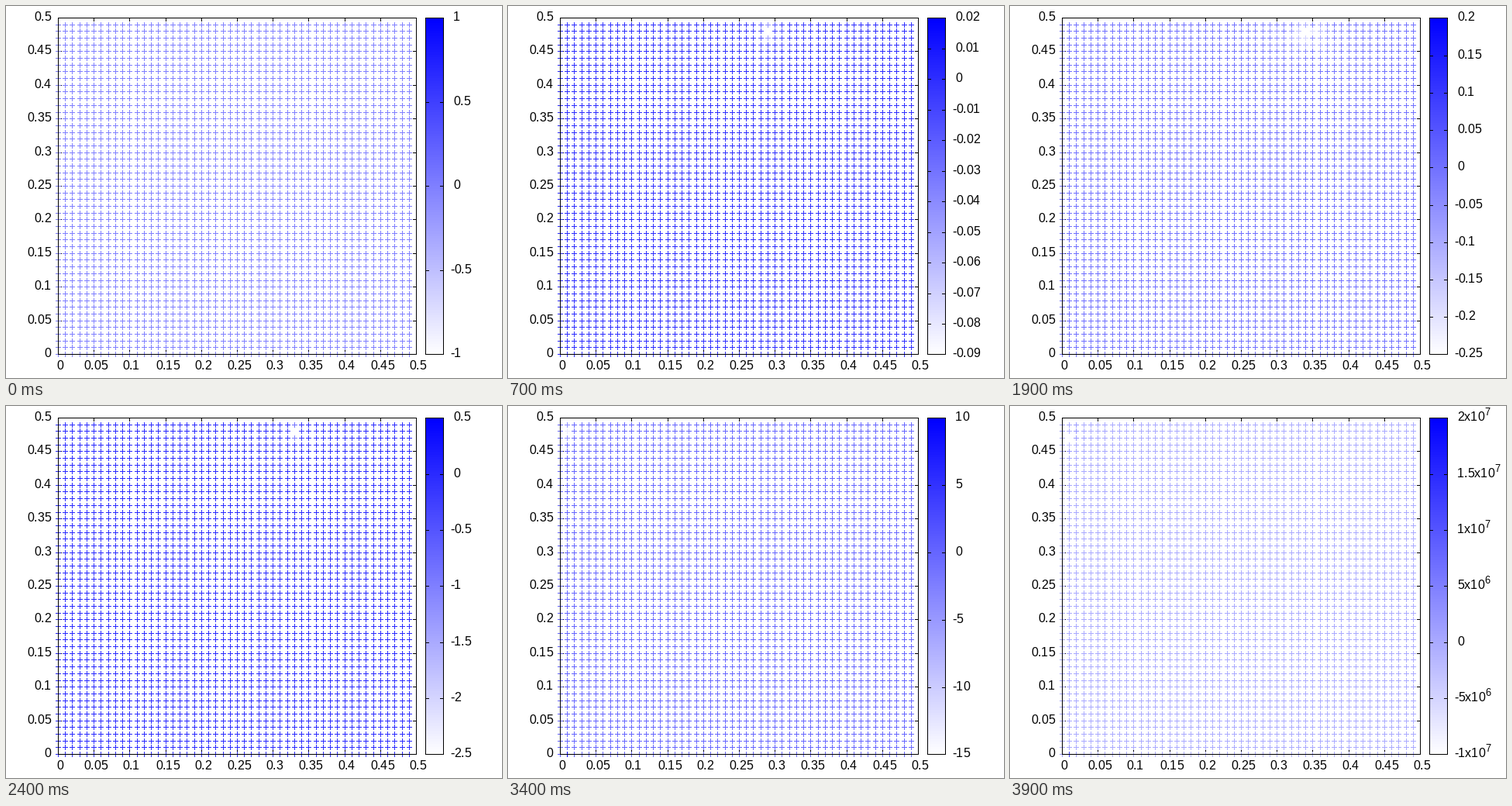
Recreate the animation shown at these times as a matplotlib script. Size 640x480 px, loop 4 s.

```python
import math

import matplotlib.pyplot as plt
import numpy as np
from matplotlib.animation import FuncAnimation
from matplotlib.collections import LineCollection

plt.rcParams["text.hinting"] = "native"

W, H, DPI = 640, 480, 100
LEFT, RIGHT, TOP, BOTTOM = 67, 529, 15, 449
BAR_L, BAR_R, BAR_TEXT = 541, 564, 573
TIC = 4
FONT_PX = 16
N = 50
FRAMES, INTERVAL = 40, 100

# Key points: step, -low, high, core column, core row, core offset, halo offset
KEYS = np.array([
    (1, .009, .002, 27, 48, -.8, -.3),
    (7, .09, .02, 29, 48, -.8, -.3),
    (19, .25, .2, 34, 48, -.5, -.6),
    (24, 2.5, .5, 33, 48, -.8, -.15),
    (29, 4, 10, 48, 48, .72, -.35),
    (34, 15, 10, 1, 48, -.5, 0),
    (39, 1e7, 2e7, 1, 47, -.4, .15),
])

ADVANCE = {" ": .278, ".": .278, "-": .333, "x": .5}


def advance(char, size=FONT_PX):
    return round(ADVANCE.get(char, .556) * size)


def text_width(s):
    return sum(advance(c) for c in s)


def hline(x0, x1, y):
    return [(x0, y + .5), (x1 + 1, y + .5)]


def vline(x, y0, y1):
    return [(x + .5, y0), (x + .5, y1 + 1)]


def box(x0, x1):
    return [hline(x0, x1, TOP), hline(x0, x1, BOTTOM),
            vline(x0, TOP, BOTTOM), vline(x1, TOP, BOTTOM)]


def px(frac):
    return LEFT + math.floor(frac * (RIGHT - LEFT) + .5)


def py(frac):
    return BOTTOM - math.floor(frac * (BOTTOM - TOP) + .5)


def palette(t):
    t = np.clip(t, 0, 1)
    return np.stack([1 - t, 1 - t, np.ones_like(t)], axis=-1)


def tick_step(span):
    power = 10.0 ** math.floor(math.log10(span) + 1e-9)
    m = span / power
    return power * (.1 if m < 1.15 else .2 if m < 1.99 else .5 if m < 4.99 else 1)


def bar_range(n):
    """Tick step and the first and last tick, as multiples of it."""
    if n == 0:
        return .5, -2, 2
    low, high = (math.exp(np.interp(n, KEYS[:, 0], np.log(KEYS[:, k])))
                 for k in (1, 2))
    step = tick_step(low + high)
    return step, -math.ceil(low / step - 1e-6), math.ceil(high / step - 1e-6)


fig = plt.figure(figsize=(W / DPI, H / DPI), dpi=DPI, facecolor="white")
ax = fig.add_axes([0, 0, 1, 1])


def add_lines(segments, zorder):
    lines = LineCollection(segments, colors="black", linewidths=72 / DPI,
                           capstyle="butt", zorder=zorder)
    lines.set_snap(False)
    ax.add_collection(lines, autolim=False)
    return lines


def put_text(x, base, s, size=FONT_PX):
    """Set characters one by one on whole pixels."""
    chars = []
    for c in s:
        if c != " ":
            chars.append(ax.text(x, base, c, family="Liberation Sans",
                                 color="black", fontsize=size * 72 / DPI,
                                 ha="left", va="baseline", zorder=5))
        x += advance(c, size)
    return chars


# Colour bar
ax.imshow(palette(np.linspace(1, 0, 128))[:, None, :], aspect="auto",
          extent=(BAR_L, BAR_R + 1, BOTTOM + 1, TOP), interpolation="nearest")
ax.set_xlim(0, W)
ax.set_ylim(H, 0)
ax.axis("off")

# Axis ticks and labels
ticks = []
for k in range(11):
    x, y = px(k / 10), py(k / 10)
    ticks += [hline(LEFT, LEFT + TIC, y), hline(RIGHT - TIC, RIGHT, y),
              vline(x, TOP, TOP + TIC), vline(x, BOTTOM - TIC - 1, BOTTOM)]
    label = f" {k * .05:g}"
    put_text(LEFT - 9 - text_width(label), y + 4, label)
    put_text(x - text_width(label) // 2, 469, label)
add_lines(ticks, 1)
add_lines(box(LEFT, RIGHT) + box(BAR_L, BAR_R), 3)
bar_ticks = add_lines([], 4)

# Grid of plus signs
cols, rows = (g.ravel() for g in np.meshgrid(np.arange(N), np.arange(N)))
points = [(px(i / N), py(j / N)) for i, j in zip(cols, rows)]
crosses = add_lines([hline(x - 3, x + 3, y) for x, y in points]
                    + [vline(x, y - 3, y + 3) for x, y in points], 2)
bar_labels = []


def field(n, zero):
    """Palette position of every grid point: a core, a rough halo, a wall echo."""
    t = np.full(N * N, zero)
    if n == 0:
        return t
    ci, cj, core, halo = (np.interp(n, KEYS[:, 0], KEYS[:, k]) for k in range(3, 7))
    ci, cj = round(ci), round(cj)
    dx, dy = cols - ci, rows - cj
    rough = np.random.default_rng(n).uniform(0, 1, N * N)
    t += core * np.exp(-(dx / .6) ** 2 - (dy / .9) ** 2)
    t += halo * rough * np.exp(-np.hypot(dx, dy) / 2.5)
    t += .7 * math.exp(-ci / 2) * np.exp(-(dx / .7) ** 2 - (rows / .5) ** 2)
    return t


def put_bar_label(value, y):
    mantissa, _, power = f"{value: g}".partition("e+")
    s = mantissa + ("x10" if power else "")
    bar_labels.extend(put_text(BAR_TEXT, y + 4, s))
    if power:
        bar_labels.extend(put_text(BAR_TEXT + text_width(s), y - 3,
                                   str(int(power)), .8 * FONT_PX))


def update(n):
    step, first, last = bar_range(n)
    crosses.set_color(np.tile(palette(field(n, -first / (last - first))), (2, 1)))
    while bar_labels:
        bar_labels.pop().remove()
    segments = []
    for k in range(first, last + 1):
        frac = (k - first) / (last - first)
        y = BOTTOM - math.floor(frac * (BOTTOM - TOP) + 1e-6)
        segments += [hline(BAR_L, BAR_L + TIC, y), hline(BAR_R - TIC, BAR_R, y)]
        put_bar_label(k * step, y)
    bar_ticks.set_segments(segments)
    return [crosses, bar_ticks, *bar_labels]


anim = FuncAnimation(fig, update, frames=FRAMES, interval=INTERVAL,
                     repeat=True, repeat_delay=0, blit=False)
plt.show()
```
